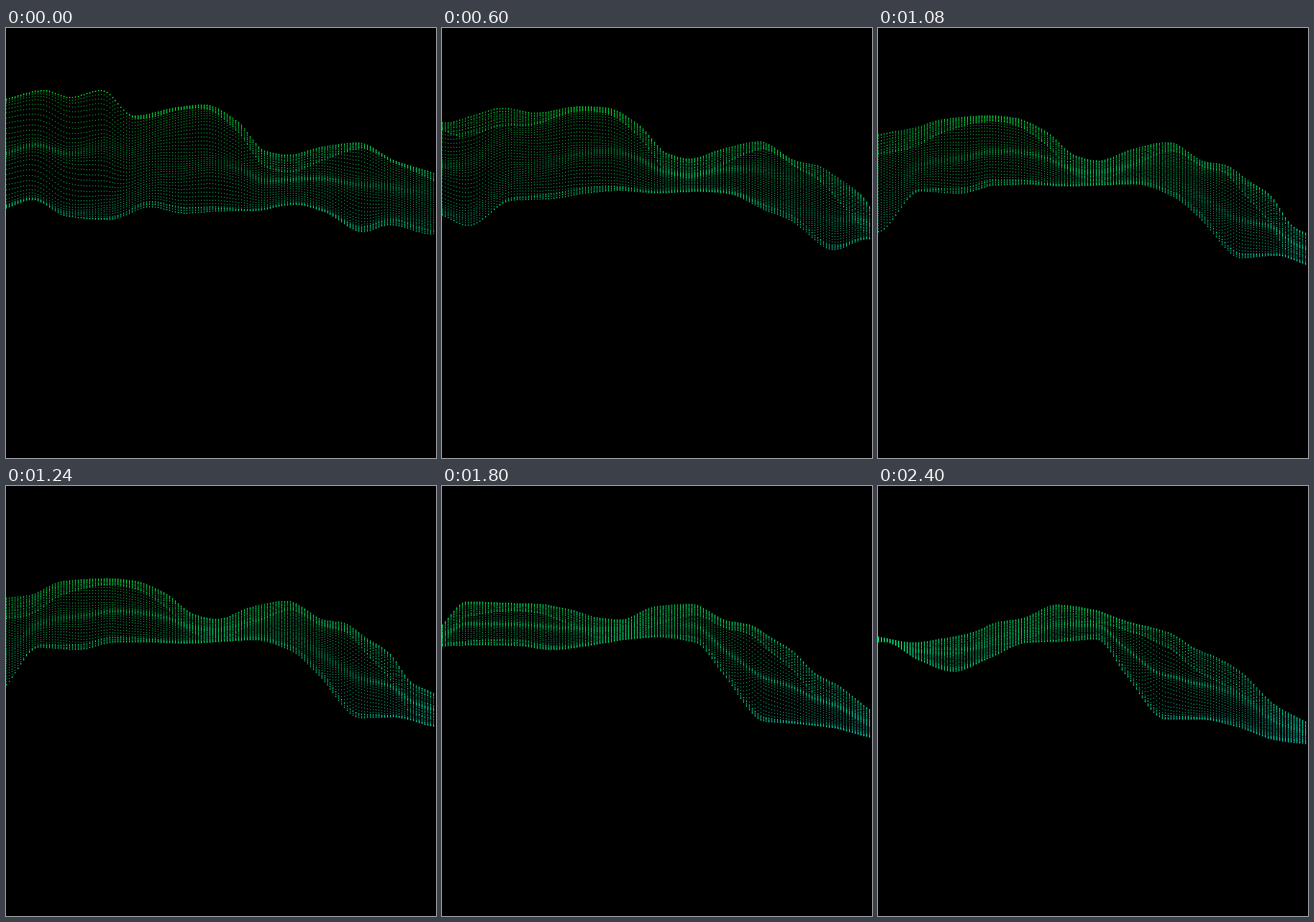
Animation, 748 px wide and 748 px high, one loop 2440 ms. Source, as an HTML page with a canvas:

```html
<!DOCTYPE html>
<html>
<head>
<meta charset="utf-8">
<style>
html, body { margin: 0; width: 100%; height: 100%; overflow: hidden; background: #000; }
canvas { display: block; }
</style>
</head>
<body>
<canvas id="stage" width="748" height="748"></canvas>
<script>
const ctx = document.getElementById('stage').getContext('2d');
const LOOP = 2440, STEP = 40, COLS = 150, ROWS = 50, GAP = 748 / 150, DRIFT = 0.1;
const { sin, cos, min, max, round, PI, TAU = 2 * PI } = Math;
const clamp = v => max(0, min(1, v));

// Crests and dips of each edge: place on the drifting cloth, then height at the
// start, middle and end of the loop.
const topKnots = [
  [0, 123, 200, 300], [65, 108, 215, 300], [110, 120, 193, 300], [165, 108, 185, 330],
  [222, 152, 163, 260], [300, 137, 158, 272], [345, 133, 162, 266], [400, 160, 184, 255],
  [450, 213, 222, 236], [490, 220, 231, 230], [550, 206, 210, 206], [612, 199, 199, 214],
  [675, 230, 232, 236], [712, 242, 238, 245], [748, 254, 262, 256], [790, 290, 290, 282],
  [830, 345, 343, 298], [870, 360, 362, 322], [930, 400, 400, 380], [990, 430, 425, 413],
];
const bottomKnots = [
  [0, 313, 400, 400], [45, 298, 345, 390], [105, 326, 357, 380], [180, 333, 281, 290],
  [250, 311, 285, 270], [310, 322, 272, 302], [370, 318, 271, 322], [430, 317, 273, 300],
  [500, 306, 270, 271], [555, 320, 268, 270], [620, 354, 288, 266], [668, 342, 330, 325],
  [740, 358, 402, 405], [800, 312, 400, 405], [860, 380, 415, 416], [930, 400, 430, 441],
  [990, 420, 440, 449],
];

// Height of every knot follows a parabola through its three values.
const knotsAt = (knots, k) => knots.map(([u, a, b, c]) => ({
  u, y: a * (1 - k) * (1 - 2 * k) + b * 4 * k * (1 - k) + c * k * (2 * k - 1),
}));

// Monotone cubic through the knots.
function curve(p) {
  const slope = i => (p[i + 1].y - p[i].y) / (p[i + 1].u - p[i].u);
  const tangent = i => {
    if (i === 0 || i === p.length - 1) return slope(max(0, i - 1));
    const a = slope(i - 1), b = slope(i);
    return a * b <= 0 ? 0 : 2 * a * b / (a + b);
  };
  return u => {
    let i = 0;
    while (i < p.length - 2 && u > p[i + 1].u) i++;
    const w = p[i + 1].u - p[i].u, k = (u - p[i].u) / w;
    return p[i].y + (p[i + 1].y - p[i].y) * k * k * (3 - 2 * k) +
      w * k * (1 - k) * ((1 - k) * tangent(i) - k * tangent(i + 1));
  };
}

function drawColumn(x, t, top, bottom) {
  const u = x + DRIFT * t;
  const height = max(0, bottom(u) - top(u));

  // The cloth folds over along its upper edge and slightly along its lower one.
  const ripple = clamp((x + 0.4 * t - 210) / 60) * (17 + 13 * sin((u - 400) / 57) + 0.005 * t);
  const corner = 40 * clamp((x - 600) / 150) * sin(PI * min(1, t / 1700));
  const upper = min(0.8 * height, ripple + corner);
  const lower = min(0.2 * height, 5 + 5 * sin(u / 60 + 3));
  const bunch = 0.03 + 0.012 * sin(u / 90), phase = u / 80 + t / 700;

  for (let r = 0; r < ROWS; r++) {
    const v = r / (ROWS - 1), w = (v - 0.2) / 0.72;
    let y = top(u);
    if (w < 0) y += upper * (1 + cos(PI * v / 0.2)) / 2;
    else if (w > 1) y += height - lower * (1 - cos(PI * (v - 0.92) / 0.08)) / 2;
    else y += height * clamp(w - bunch * (sin(2 * TAU * w + phase) - sin(phase)) - 0.03 * sin(2 * TAU * w));
    ctx.fillStyle = `rgb(0,240,${round(y / 2 - 10)})`;
    ctx.fillRect(round(x), round(y), 1.25, 1.25);
  }
}

function frame(now) {
  const t = Math.floor(now % LOOP / STEP) * STEP, k = t / (LOOP - STEP);
  const top = curve(knotsAt(topKnots, k)), bottom = curve(knotsAt(bottomKnots, k));
  ctx.fillStyle = '#000';
  ctx.fillRect(0, 0, 748, 748);
  for (let c = 0; c < COLS; c++) drawColumn(c * GAP, t, top, bottom);
  requestAnimationFrame(frame);
}
requestAnimationFrame(frame);
</script>
</body>
</html>
```
